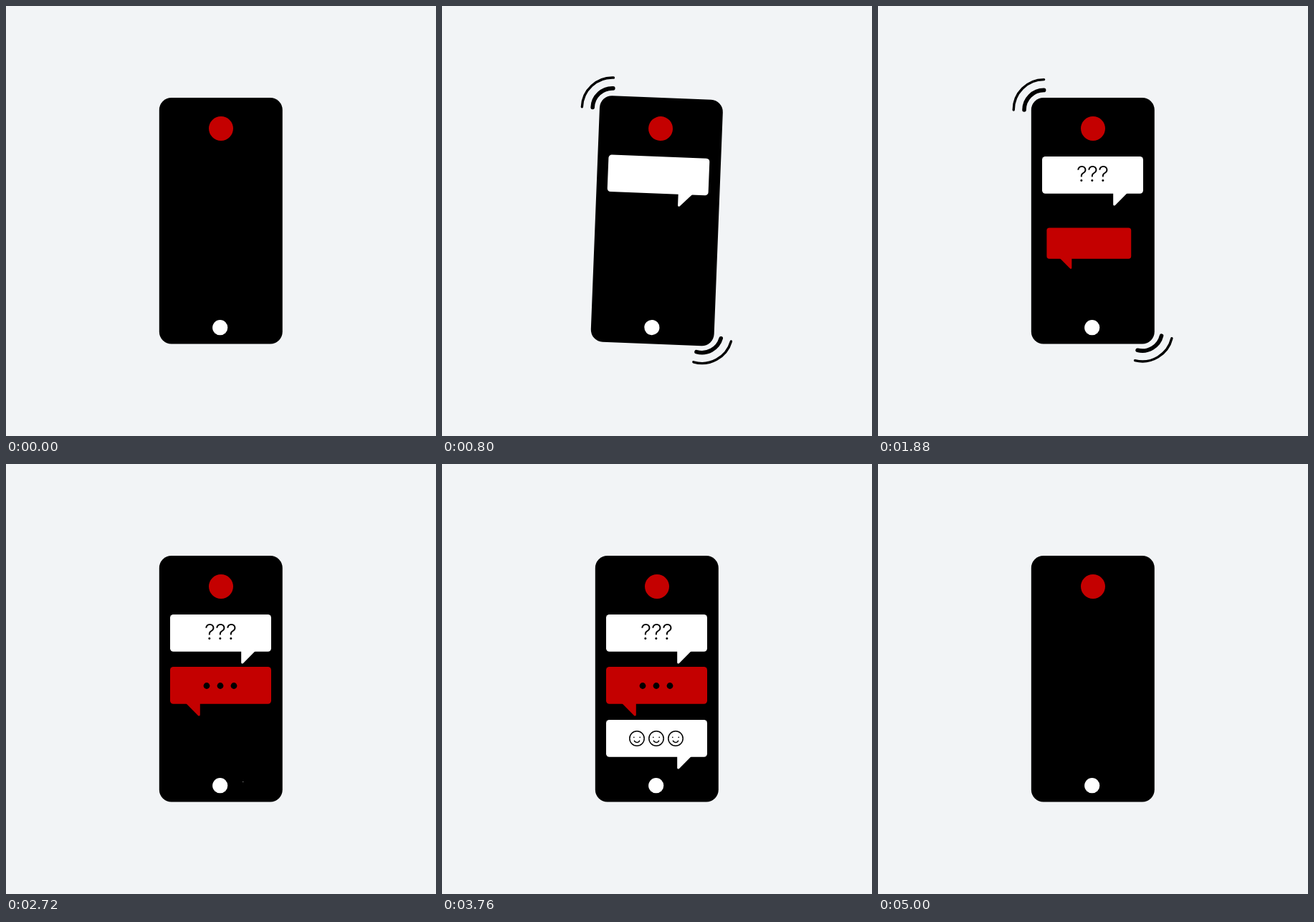
Recreate the animation shown at these times as an HTML page with a canvas. Size 600 by 600 pixels, loop 5.08 s.

```html
<!DOCTYPE html>
<html lang="en">
<head>
<meta charset="utf-8">
<title>Chat on a phone</title>
<style>
  html, body { margin: 0; width: 100%; height: 100%; overflow: hidden; background: #f2f4f6; }
  canvas { display: block; width: 600px; height: 600px; }
</style>
</head>
<body>
<canvas id="stage" width="600" height="600"></canvas>
<script>
const ctx = document.getElementById('stage').getContext('2d');
const LOOP = 5080, STEP = 40, SHRINK = 560;
const BUZZ_DELAY = 20, SWING = 240, WAVES_END = 520;
const RED = '#c40000', WHITE = '#fff', BLACK = '#000', PAPER = '#f2f4f6';

const clamp = v => Math.max(0, Math.min(1, v));
const smooth = v => { v = clamp(v); return v * v * (3 - 2 * v); };

// Grow past full size to `peak`, then settle at 1.
const pop = (u, peak) => u < 0.6
  ? peak * smooth(u / 0.6)
  : peak + (1 - peak) * smooth((u - 0.6) / 0.4);

function disc(x, y, r, color) {
  ctx.fillStyle = color;
  ctx.beginPath();
  ctx.arc(x, y, r, 0, 7);
  ctx.fill();
}

function box(x, y, w, h, r, color) {
  ctx.fillStyle = color;
  ctx.beginPath();
  ctx.roundRect(x, y, w, h, r);
  ctx.fill();
}

function arc(x, y, r, from, to, width) {
  ctx.lineWidth = width;
  ctx.beginPath();
  ctx.arc(x, y, r, from * Math.PI / 180, to * Math.PI / 180);
  ctx.stroke();
}

function question(s) {
  ctx.scale(Math.min(1, s), s);
  ctx.fillStyle = BLACK;
  ctx.font = '300 30px Inter, "Open Sans", sans-serif';
  ctx.textAlign = 'center';
  ctx.fillText('?', 0, 0);
}

function dot(s) {
  disc(0, 0, 4.4 * s, BLACK);
}

function smiley(s) {
  ctx.scale(s, s);
  ctx.strokeStyle = BLACK;
  arc(0, 0, 10.2, 0, 360, 1.5);
  arc(0, 1.4, 4, 28, 152, 1.5);
  disc(-4.2, -1.6, 0.8, BLACK);
  disc(4.2, -1.6, 0.8, BLACK);
}

// Each bubble grows out of the bottom of the screen and shrinks into its tail tip.
const bubbles = [
  { start: 340, grow: 410, x: 331, y: 278.3, launch: 452, dir: 1, color: WHITE, end: 4240,
    icon: question, from: 880, lag: 120, span: 200, peak: 1.22, mid: 299.5, gap: 15, iconY: 245.5 },
  { start: 1620, grow: 350, x: 268, y: 351.3, launch: 444, dir: -1, color: RED, end: 4340,
    icon: dot, from: 2160, lag: 60, span: 160, peak: 2, mid: 299, gap: 19, iconY: 309.5 },
  { start: 2700, grow: 350, x: 331, y: 425.3, launch: 444, dir: 1, color: WHITE, end: 4440,
    icon: smiley, from: 3240, lag: 120, span: 280, peak: 1.38, mid: 299, gap: 27, iconY: 383 }
];

function bubbleShape(color) {
  box(-102, -68.3, 141, 51.7, 4.5, color);
  ctx.strokeStyle = color;
  ctx.lineWidth = 3;
  ctx.beginPath();
  ctx.moveTo(-1.3, -19);
  ctx.lineTo(-1.3, -1.2);
  ctx.lineTo(16.5, -19);
  ctx.closePath();
  ctx.fill();
  ctx.stroke();
}

function drawBubble(b, t) {
  const rise = smooth((t - b.start) / b.grow);
  const size = rise * (1 - smooth((t - b.end) / SHRINK));
  if (size <= 0) return;
  ctx.save();
  ctx.translate(b.x, b.launch + (b.y - b.launch) * rise);
  ctx.scale(size, size);
  ctx.save();
  ctx.scale(b.dir, 1);
  bubbleShape(b.color);
  ctx.restore();
  for (let i = 0; i < 3; i++) {
    const u = clamp((t - b.from - i * b.lag) / b.span);
    if (!u) continue;
    ctx.save();
    ctx.translate(b.mid + (i - 1) * b.gap - b.x, b.iconY - b.y);
    b.icon(pop(u, b.peak));
    ctx.restore();
  }
  ctx.restore();
}

function drawWaves() {
  ctx.strokeStyle = BLACK;
  for (const [r, width] of [[42.4, 3.4], [27.6, 5.6]]) {
    arc(231.6, 145, r, 180, 270, width);
    arc(368.8, 453.5, r, 14, 104, width);
  }
}

function draw(t) {
  // Time into the current buzz: one swing left, then one swing right with waves.
  const buzz = bubbles.map(b => t - b.start - BUZZ_DELAY).find(d => d >= 0 && d < WAVES_END) || 0;
  const turn = Math.min(buzz / SWING, 2) * Math.PI;
  ctx.fillStyle = PAPER;
  ctx.fillRect(0, 0, 600, 600);
  ctx.save();
  ctx.lineCap = ctx.lineJoin = 'round';
  ctx.translate(300, 300);
  ctx.rotate(-4.5 * Math.PI / 180 * Math.sin(turn));
  ctx.translate(-300, -300);
  if (buzz >= SWING) drawWaves();
  box(213.8, 127.9, 172, 343.7, 17, BLACK);
  disc(300, 171, 17, RED);
  disc(298.7, 448.7, 10.6, WHITE);
  bubbles.forEach(b => drawBubble(b, t));
  ctx.restore();
}

const begin = performance.now();
function frame() {
  const t = (performance.now() - begin) % LOOP;
  draw(Math.floor(t / STEP) * STEP);
  requestAnimationFrame(frame);
}
frame();
</script>
</body>
</html>
```
